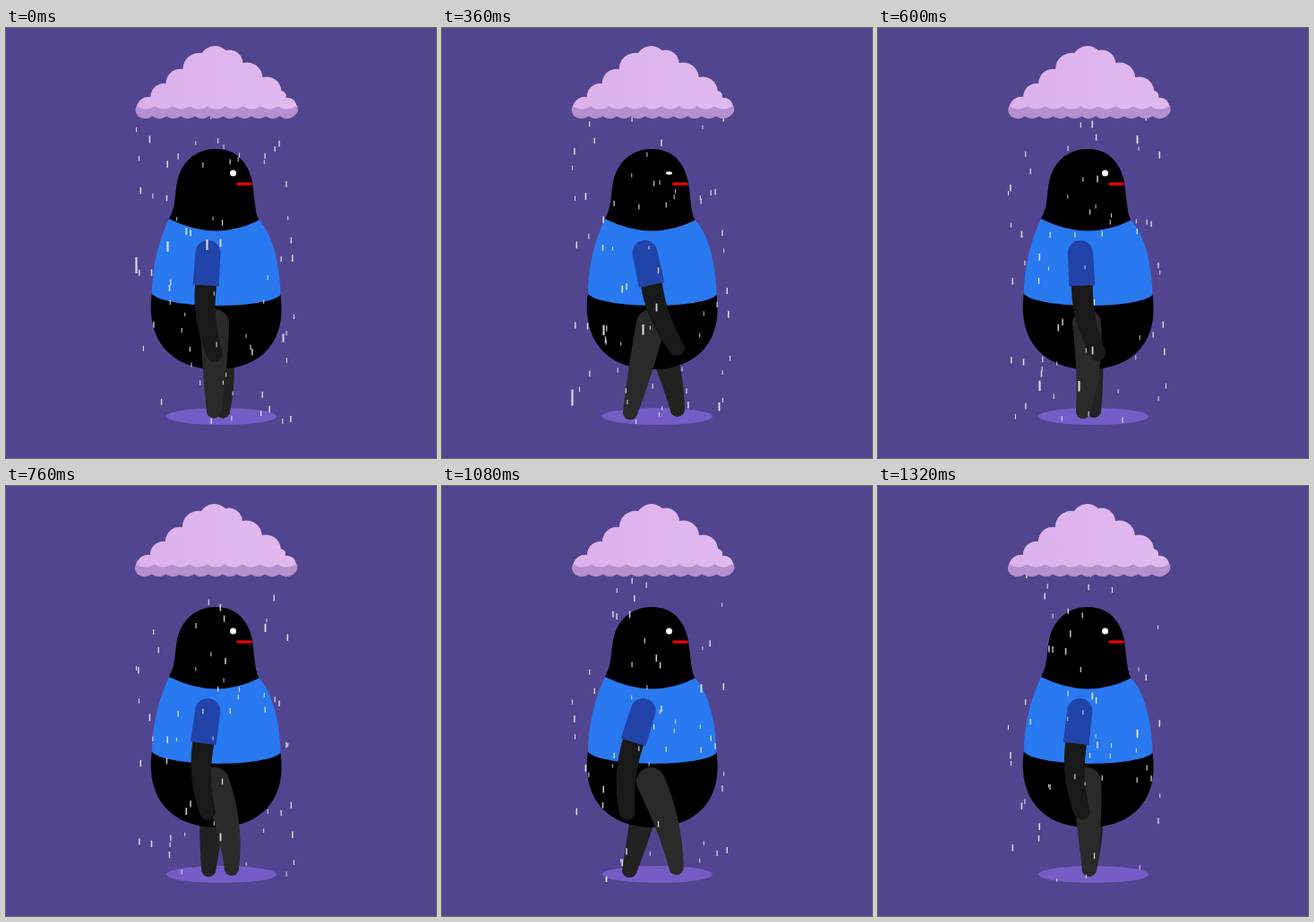
Recreate the animation shown at these times as an HTML page with a canvas. Size 480 by 480 pixels, loop 1360 ms.

```html
<!DOCTYPE html>
<html lang="en">
<head>
<meta charset="utf-8">
<title>Rainy walk</title>
<style>
html, body { margin: 0; height: 100%; overflow: hidden; background: #524590; }
canvas { display: block; width: 100vw; height: 100vh; }
</style>
</head>
<body>
<canvas width="480" height="480"></canvas>
<script>
const ctx = document.querySelector('canvas').getContext('2d');
const { sin, cos, max, min, PI } = Math;
const LOOP = 1360, STEP = 40, TAU = PI * 2;

const HEAD = new Path2D('M182 213C190 198 188 187 191 172C196 148 213 135 234.5 135C257 135 270 150 274.5 170C278 190 277 202 282 214L270 232H195Z');
const BELLY = new Path2D('M163 295C155 350 186 381 235 381C284 381 315 350 306 295Z');
const SHIRT = new Path2D('M182 213Q234 239 282.5 214.5C298 230 306 266 306.5 298C290 314 180 314 163 297C163 268 170 238 182 213Z');
const SLEEVE = new Path2D('M-14 0A14 14 0 0 1 14 0L14.5 36.5H-14.5Z');

// Outward arcs through the points; roundness is radius / chord.
function bumps(points, roundness) {
  return points.slice(1).map(([x, y], i) => {
    const r = Math.hypot(x - points[i][0], y - points[i][1]) * roundness;
    return `A${r} ${r} 0 0 1 ${x} ${y}`;
  }).join('');
}

// Even scallops running from right to left.
function scallops(right, left, y, count) {
  const points = Array.from({ length: count + 1 }, (_, i) => [right + (left - right) * i / count, y]);
  return `L${right} ${y}` + bumps(points, .9);
}

const RIDGE = [[146, 91], [162, 77], [179, 62], [198, 46], [219, 28], [246, 25],
  [265, 39], [287, 55], [308, 70], [313, 78], [325, 88]];
const CLOUD_TOP = new Path2D('M146 91' + bumps(RIDGE, .65) + scallops(324, 147, 87.5, 9) + 'Z');
const CLOUD_BASE = new Path2D('M148 98A8 8 0 0 1 146 88L160 80H312L325 86A8 8 0 0 1 322 98' +
  scallops(322, 148, 98.5, 11) + 'Z');

// Drops are x, y at time zero and speed; the first few are the heavy ones.
let seed = 11;
const random = () => (seed = seed * 16807 % 2147483647) / 2147483647;
const DROPS = [[145, 265, .41], [239, 240, .2], [224, 242, .263], [309, 346, .213], [180, 244, .259], [289, -2, .211]];
for (let i = 0; i < 100; i++) DROPS.push([145 + random() * 176, random() * 590 - 150, .09 + random() * .09]);

function fill(path, color) {
  ctx.fillStyle = color;
  ctx.fill(path);
}

function ellipse(x, y, rx, ry, color) {
  const path = new Path2D();
  path.ellipse(x, y, rx, ry, 0, 0, TAU);
  fill(path, color);
}

// Tapered limb along a quadratic curve.
function limb(x0, y0, x1, y1, bend, r0, r1, taper, color) {
  const cx = (x0 + x1) / 2 + bend, cy = (y0 + y1) / 2, path = new Path2D();
  for (let i = 0; i <= 60; i++) {
    const u = i / 60, v = 1 - u;
    const x = v * v * x0 + 2 * u * v * cx + u * u * x1;
    const y = v * v * y0 + 2 * u * v * cy + u * u * y1;
    const r = r0 + (r1 - r0) * u ** taper;
    path.moveTo(x + r, y);
    path.arc(x, y, r, 0, TAU);
  }
  fill(path, color);
}

function leg(t, color) {
  const a = t / LOOP * TAU;
  const footX = 237 - 26 * sin(a) + 3 * sin(2 * a) - 5 * cos(a) * cos(2 * a);
  const footY = 427.5 + 1.7 * sin(a);
  const bend = 4.4 + 5.6 * cos(a - 4);
  limb(233, 330, footX, footY, bend, 16, 8.2, 1.5, color);
}

function arm(t) {
  const swing = cos((t - 350) / LOOP * TAU);
  const angle = (3 - 15 * swing) * PI / 180;
  const x = 225.5 + swing;
  limb(x - 36 * sin(angle), 251 + 36 * cos(angle),
    234 + 28 * swing, 364 - 7 * max(0, swing) ** 2, -9, 12, 9, 1.5, '#191919');
  ctx.save();
  ctx.translate(x, 251);
  ctx.rotate(angle);
  fill(SLEEVE, '#2243a8');
  ctx.restore();
}

function eye(t) {
  const blink = t < 460 ? max(0, sin((t - 20) / 440 * PI)) : 0;
  ellipse(253.5, 162, 3.5, 3.5 * (1 - .8 * blink), '#fff');
}

function rain(t) {
  ctx.strokeStyle = 'rgba(255,255,255,.8)';
  for (const [x, y0, speed] of DROPS) {
    const y = y0 + speed * t, half = speed * 22;
    if (y < 94 || y > 440) continue;
    ctx.lineWidth = min(2.2, max(1, speed * 9));
    ctx.beginPath();
    ctx.moveTo(x + .5, y - half);
    ctx.lineTo(x + .5, min(442, y + half));
    ctx.stroke();
  }
}

function cloud(t) {
  const light = ctx.createLinearGradient(146, 0, 324, 0);
  light.addColorStop(0, '#dcb1ec');
  light.addColorStop(1, '#e0b9ef');
  ctx.save();
  ctx.translate(-.5 - sin(t / LOOP * 2 * TAU), 0);
  fill(CLOUD_BASE, '#b58fce');
  fill(CLOUD_TOP, light);
  ctx.restore();
}

function draw(now) {
  const t = Math.floor(now % LOOP / STEP) * STEP;
  ctx.fillStyle = '#524590';
  ctx.fillRect(0, 0, 480, 480);
  ellipse(240.5, 433.5, 61.5, 9.5, '#755cc6');
  leg(t + LOOP / 2, '#222');
  fill(BELLY, '#000');
  fill(HEAD, '#000');
  fill(SHIRT, '#2979f0');
  leg(t, '#2a2a2a');
  arm(t);
  eye(t);
  ctx.fillStyle = '#f00';
  ctx.fillRect(257.5, 172.5, 17, 3);
  rain(t);
  cloud(t);
  requestAnimationFrame(draw);
}
requestAnimationFrame(draw);
</script>
</body>
</html>
```
